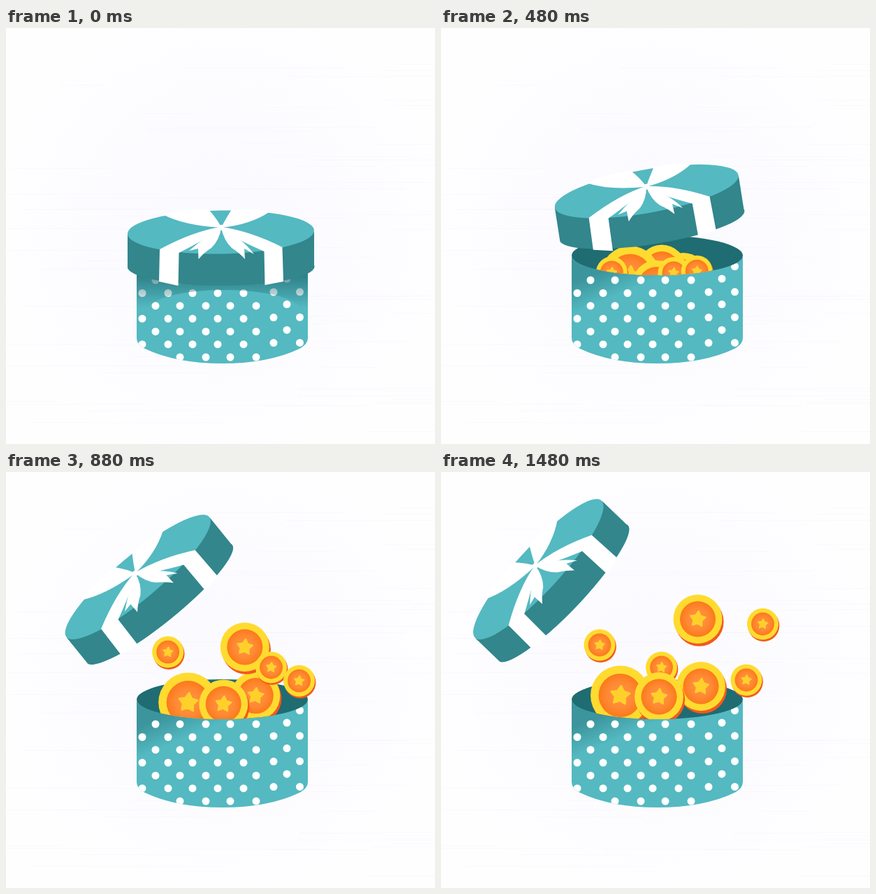
An HTML page with a canvas for the animation above (2.08 s loop, 614 by 594 pixels).

```html
<!DOCTYPE html>
<html lang="en">
<head>
<meta charset="utf-8">
<title>Gift box</title>
<style>
  html, body { margin: 0; width: 100%; height: 100%; overflow: hidden; background: #fdfdff; }
  canvas { display: block; }
</style>
</head>
<body>
<canvas id="stage" width="614" height="594"></canvas>
<script>
const ctx = document.getElementById('stage').getContext('2d');
const W = 614, H = 594, LOOP = 2080, STEP = 40, TAU = Math.PI * 2;
const TEAL = '#54b9c1', DARK = '#32868c', INSIDE = '#1f6c72', WHITE = '#ffffff';

const LID_TIMES = [40, 320, 560, 640, 800, 1000, 1160, 1480];
const LID = {
  x: [308, 309, 281, 263, 210, 155, 137, 135],
  y: [285, 259, 208, 190, 157, 134, 134, 134],
  angle: [0, -1.5, -14.5, -21, -34, -44, -45.8, -46.3]
};

// Coins from back to front.
const COIN_TIMES = [320, 640, 800, 1000, 1160, 1480];
const COINS = [
  { r: 22.5, x: [317, 317, 317, 317, 316, 315.5], y: [370, 345, 335, 318, 294, 279] },
  { r: 35, x: [345, 350, 354, 363, 369, 372], y: [365, 340, 325, 313, 307, 306] },
  { r: 35, x: [316, 316, 333, 354, 365, 367.5], y: [360, 314, 270, 226, 211, 210] },
  { r: 42.5, x: [272, 268, 263, 258, 256.5, 256.5], y: [357, 347, 336, 321, 319, 319] },
  { r: 35, x: [308, 309, 311, 311.5, 312, 312], y: [375, 352, 338, 324, 321, 321] },
  { r: 22.5, x: [246, 241, 235, 228, 227, 227], y: [362, 321, 270, 247, 247, 247] },
  { r: 22.5, x: [330, 340, 363, 407, 438, 460.5], y: [362, 326, 297, 252, 226, 217] },
  { r: 22.5, x: [362, 376, 405, 434.5, 437, 437], y: [362, 322, 300, 297, 297, 297] }
];

const clamp = v => Math.max(0, Math.min(1, v));

// Monotone cubic interpolation with still ends.
function sample(times, values, t) {
  const last = times.length - 1;
  if (t <= times[0]) return values[0];
  if (t >= times[last]) return values[last];
  let i = 0;
  while (t >= times[i + 1]) i++;
  const slope = k => (values[k + 1] - values[k]) / (times[k + 1] - times[k]);
  const tangent = k => {
    if (k === 0 || k === last) return 0;
    const a = slope(k - 1), b = slope(k);
    return a * b > 0 ? 2 * a * b / (a + b) : 0;
  };
  const h = times[i + 1] - times[i], u = (t - times[i]) / h, v = 1 - u;
  return values[i] * v * v * (1 + 2 * u) + values[i + 1] * u * u * (3 - 2 * u)
    + h * u * v * (v * tangent(i) - u * tangent(i + 1));
}

function fill(path, color) {
  ctx.fillStyle = color;
  ctx.fill(new Path2D(path));
}

function ellipse(x, y, rx, ry, color, turn = 0) {
  ctx.beginPath();
  ctx.ellipse(x, y, rx, ry, turn, 0, TAU);
  ctx.fillStyle = color;
  ctx.fill();
}

const disc = (x, y, r, color) => ellipse(x, y, r, r, color);

function drawBackground() {
  ctx.fillStyle = '#fefeff';
  ctx.fillRect(0, 0, W, H);
  const glow = ctx.createRadialGradient(307, 290, 60, 307, 290, 330);
  glow.addColorStop(0, '#fbfaff');
  glow.addColorStop(1, 'rgba(251,250,255,0)');
  ctx.fillStyle = glow;
  ctx.fillRect(0, 0, W, H);
  let seed = 7;
  const random = () => (seed = seed * 16807 % 2147483647) / 2147483647;
  ctx.fillStyle = 'rgba(236,236,246,.28)';
  for (let i = 0; i < 70; i++) {
    const width = 60 + random() * 240;
    ctx.fillRect(random() * (W + 100) - 100, Math.floor(40 + random() * 540), width, 1);
  }
}

const body = new Path2D('M187 325 A122.5 28 0 0 0 432 325 V443 Q432 451 421 457.5 Q376 479 310 479 Q243 479 198 457.5 Q187 451 187 443 Z');

function drawDots() {
  const column = (x, top, bottom, gap) => {
    for (let y = top; y <= bottom; y += gap) disc(x, y, 5.5, WHITE);
  };
  [214, 249, 286, 321, 358].forEach((x, i) => column(x, 360, i ? 475 : 440, 36.7));
  [195, 232, 267, 303, 340].forEach(x => column(x, 378.5, 460, 36.6));
  column(383, 377, 460, 36.3);
  column(402, 358, 440, 36.6);
  column(420.5, 340.5, 460, 36.3);
}

function shade(x0, y0, x1, y1, hold, alpha) {
  const g = ctx.createLinearGradient(x0, y0, x1, y1);
  g.addColorStop(0, `rgba(30,105,112,${alpha})`);
  g.addColorStop(hold, `rgba(30,105,112,${alpha})`);
  g.addColorStop(1, 'rgba(30,105,112,0)');
  return g;
}

function drawBox(open) {
  ctx.save();
  ctx.clip(body);
  ctx.fillStyle = TEAL;
  ctx.fillRect(180, 300, 260, 190);

  // Slanted shadow of the opened box.
  ctx.globalAlpha = open;
  ctx.fillStyle = shade(187, 330, 215, 397, 0.45, 0.45);
  ctx.fillRect(180, 300, 260, 190);
  ctx.globalAlpha = 1;
  drawDots();

  // Shadow cast by the closed lid.
  ctx.globalAlpha = 1 - open;
  ctx.fillStyle = shade(0, 350, 0, 400, 0, 0.75);
  ctx.beginPath();
  ctx.rect(180, 320, 260, 90);
  ctx.ellipse(312, 402, 108, 28, 0, 0, TAU);
  ctx.fill('evenodd');
  ctx.restore();
}

function drawStar(x, y, r) {
  ctx.beginPath();
  for (let i = 0; i < 10; i++) {
    const a = i * TAU / 10 - TAU / 4 + 0.1, d = i % 2 ? r * 0.54 : r;
    ctx.lineTo(x + d * Math.cos(a), y + d * Math.sin(a));
  }
  ctx.closePath();
  ctx.fillStyle = ctx.strokeStyle = '#ffd02c';
  ctx.lineWidth = r * 0.22;
  ctx.lineJoin = 'round';
  ctx.fill();
  ctx.stroke();
}

function drawCoin(x, y, r) {
  disc(x + r * 0.06, y + r * 0.11, r, '#f5581c');
  disc(x, y, r, '#ffdb30');
  const core = ctx.createRadialGradient(x, y, 0, x, y, r * 0.73);
  core.addColorStop(0, '#ff9642');
  core.addColorStop(0.6, '#ff8934');
  core.addColorStop(1, '#fc791b');
  disc(x, y, r * 0.73, core);
  drawStar(x, y, r * 0.32);
}

function drawCoins(t) {
  ctx.save();
  ctx.clip(new Path2D('M0 0 H614 V325 H432 A122.5 28 0 0 1 187 325 H0 Z'));
  for (const c of COINS) {
    drawCoin(sample(COIN_TIMES, c.x, t), sample(COIN_TIMES, c.y, t), c.r);
  }
  ctx.restore();
}

function drawLid(t) {
  ctx.save();
  ctx.translate(sample(LID_TIMES, LID.x, t), sample(LID_TIMES, LID.y, t));
  ctx.rotate(sample(LID_TIMES, LID.angle, t) * Math.PI / 180);
  ctx.translate(-308, -285);

  fill('M174 295 L441 291 V338 A133.5 27 0 0 1 174 343 Z', DARK);
  ellipse(307.5, 291.5, 133.5, 31, TEAL, -0.018);

  // Ribbon across the back, down the front and over the rim.
  fill('M224 266 Q254 282 308 285 Q304 275 290 259 Q255 258 224 266 Z', WHITE);
  fill('M378 262 Q350 281 308 285 Q313 275 323 259 Q350 257 378 262 Z', WHITE);
  fill('M308 284 Q268 290 220 316 L219 362 L246.5 368 L247.5 321 Q285 302 308 287 Z', WHITE);
  fill('M308 284 Q350 290 395.5 313 L397 362 L370.5 367 L369.5 319 Q330 302 308 287 Z', WHITE);

  // Bow tails.
  fill('M308 285 Q285 298 262 318 L275 315 L275.5 330 Q284 320 294 314 Q306 302 308 285 Z', WHITE);
  fill('M308 285 Q312 304 323 314 Q334 321 342 330 L341 315 L355 323 Q338 300 308 285 Z', WHITE);
  disc(308, 285, 4, WHITE);
  ctx.restore();
}

function frame(now) {
  const t = Math.floor(now % LOOP / STEP) * STEP;
  drawBackground();
  ellipse(309.5, 325, 122.5, 29, INSIDE);
  drawBox(clamp((t - 40) / 280));
  drawCoins(t);
  drawLid(t);
}

let start;
function tick(now) {
  start ??= now;
  frame(now - start);
  requestAnimationFrame(tick);
}
frame(0);
requestAnimationFrame(tick);
</script>
</body>
</html>
```
